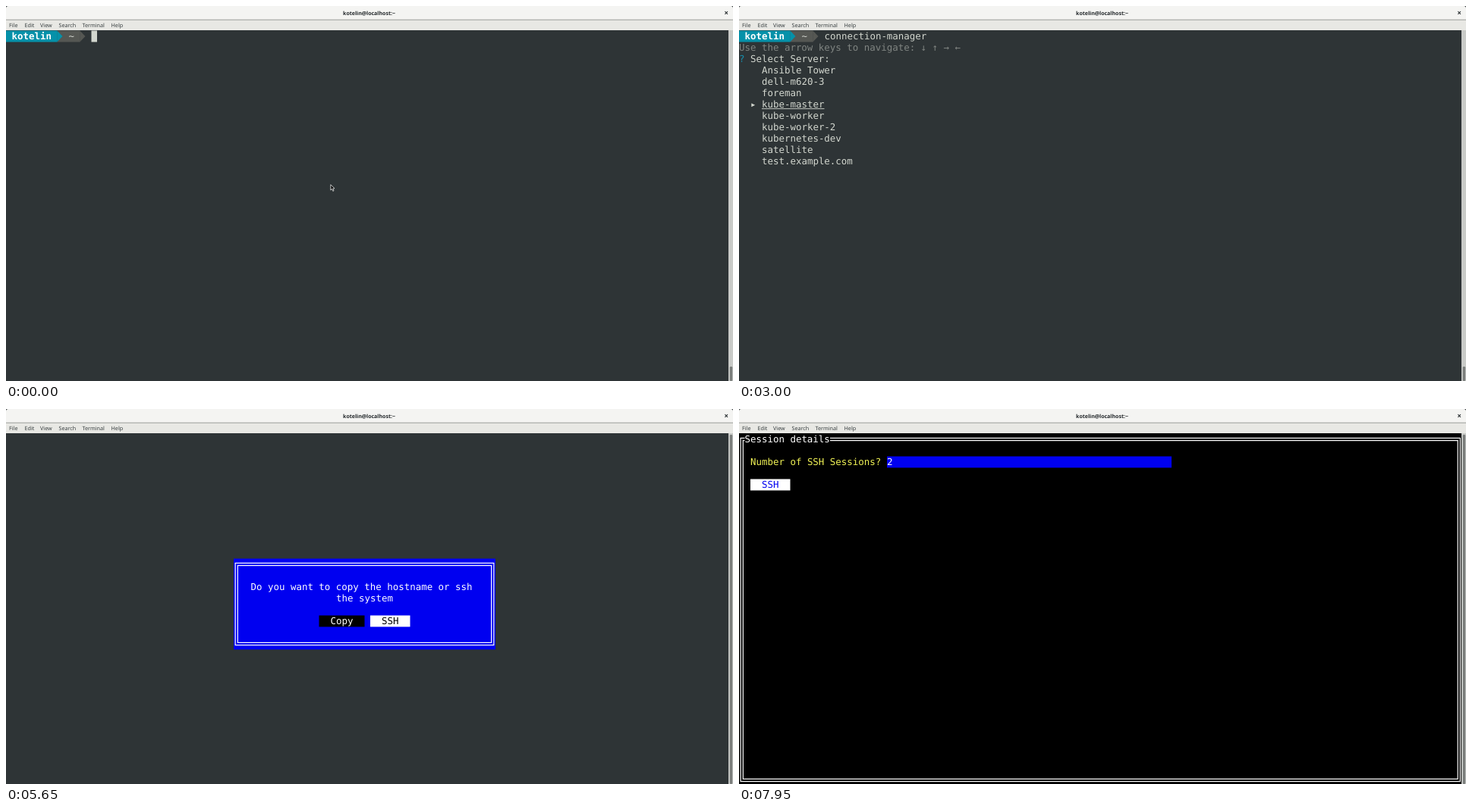
An HTML page for the animation above (8 s loop, 958 px wide and 495 px high).

```html
<!DOCTYPE html>
<html lang="en">
<head>
<meta charset="utf-8">
<title>Connection manager</title>
<style>
html, body { margin: 0; width: 100%; height: 100%; overflow: hidden; background: #2e3436; }
svg { display: block; width: 958px; height: 495px; }
text { white-space: pre; text-rendering: geometricPrecision; }
.mono { font: 12.457px "DejaVu Sans Mono", monospace; }
.ui { font: 7.2px "Noto Sans", "Open Sans", sans-serif; fill: #3a4042; }
.title { font-weight: 600; font-size: 7px; fill: #22272a; text-anchor: middle; }
</style>
</head>
<body>
<svg id="stage" viewBox="0 0 958 495" xmlns="http://www.w3.org/2000/svg">
  <rect width="958" height="32" fill="#2e3436"/>
  <path d="M0 18V3Q0 0 3 0H955Q958 0 958 3V18Z" fill="#f4f4f2"/>
  <rect y="17.5" width="958" height="1" fill="#c3c4c0"/>
  <rect y="18.5" width="958" height="13.5" fill="#e8e8e4"/>
  <text class="ui title" x="478.5" y="11.8">kotelin@localhost:~</text>
  <path d="M947.4 7.2l3.6 3.6m0-3.6l-3.6 3.6" stroke="#2e3436" stroke-width="1.1"/>
  <g id="menu" class="ui"></g>
  <g id="screen" class="mono"></g>
  <rect x="952" y="32" width="6" height="463" fill="#c9cbc8"/>
  <rect id="thumb" x="953.8" width="3.4" rx="1.2" fill="#7b7e7c"/>
</svg>
<script>
const LOOP = 8000, CW = 7.5, CH = 15, TOP = 32.5;
const FG = '#d3d7cf', BG = '#2e3436', BLUE = '#0000f0', TEAL = '#0591a9', GREY = '#555753';
const USER = 'kotelin', COMMAND = 'connection-manager';
const SERVERS = ['Ansible Tower', 'dell-m620-3', 'foreman', 'kube-master', 'kube-worker',
  'kube-worker-2', 'kubernetes-dev', 'satellite', 'test.example.com'];

// Steps are [start time, value] pairs; the last one reached applies.
const TYPED = [[0, 0], [550, 1], [850, 2], [1150, 3], [1300, 4], [1500, 19]];
const PICKED = [[1950, 0], [2450, 1], [3000, 3], [3050, 4], [3100, 6], [3150, 7], [3200, 8],
  [3600, 7], [3750, 6], [3900, 5], [4100, 4], [4200, 3], [4350, 2]];
const SESSIONS = [[6100, '1'], [7200, ''], [7550, '2']];

const $ = id => document.getElementById(id);
const at = (steps, t) => steps.reduce((v, [start, value]) => t >= start ? value : v, steps[0][1]);
const between = (t, a, b) => t >= a && t < b;

const rect = (x, y, w, h, fill) => `<rect x="${x}" y="${y}" width="${w}" height="${h}" fill="${fill}"/>`;
const cells = (col, row, w, h, fill) => rect(col * CW, TOP + row * CH, w * CW, h * CH, fill);
const text = (col, row, s, fill = FG, extra = '') =>
  `<text x="${col * CW}" y="${44.2 + row * CH}" fill="${fill}" ${extra}>${s}</text>`;
const cursor = (col, row) => cells(col, row, 1, 1, FG);
const button = (col, row, label, bg, fg) =>
  cells(col, row, label.length + 4, 1, bg) + text(col + 2, row, label, fg);

function doubleFrame(col, row, w, h) {
  const x = (col + .5) * CW, y = TOP + (row + .5) * CH;
  const outline = d => `<rect x="${x - d}" y="${y - d}" width="${(w - 1) * CW + 2 * d}"
    height="${(h - 1) * CH + 2 * d}" fill="none" stroke="#fff" stroke-width="1.2"/>`;
  return outline(1.6) + outline(-1.6);
}

function prompt() {
  const arrow = (col, fill) => {
    const x = col * CW;
    return `<path d="M${x - .2} ${TOP}L${x + 7} ${TOP + 7.5}L${x - .2} ${TOP + CH}Z" fill="${fill}"/>`;
  };
  return cells(9, 0, 4, 1, GREY) + cells(0, 0, 9, 1, TEAL) + arrow(9, TEAL) + arrow(13, GREY) +
    text(1, 0, USER, '#fff', 'font-weight="bold"') + text(11, 0, '~');
}

function pointer(t) {
  if (t >= 600) return '';
  const [x, y] = t < 50 ? [427.8, 235.8] : [425, 232];
  return `<path transform="translate(${x} ${y})" d="M0 0V7.2L1.8 5.7L3 8.6L4.2 8L3 5.2L5.2 5Z"
    fill="#111" stroke="#fff" stroke-width=".7"/>`;
}

function shell(t) {
  const n = at(TYPED, t);
  const shown = between(t, 250, 550) ? '' : cursor(15 + n, 0);
  return prompt() + text(15, 0, COMMAND.slice(0, n)) + shown + pointer(t);
}

function picker(t) {
  const picked = at(PICKED, t);
  const rows = SERVERS.map((name, i) => {
    const row = 3 + i, line = text(4, row, name);
    if (i !== picked) return line;
    return text(2, row, '▸') + line + rect(4 * CW, 45.2 + row * CH, name.length * CW, .9, FG);
  });
  return prompt() + text(15, 0, COMMAND) +
    text(0, 1, 'Use the arrow keys to navigate: ↓ ↑ → ←', '#808582') +
    text(0, 2, '?', '#168fae') + text(2, 2, 'Select Server:') + rows.join('');
}

function dialog(t) {
  const copy = t < 5650, on = ['#fff', '#000'], off = ['#000', '#fff'];
  return cells(40, 11, 46, 8, BLUE) + doubleFrame(40, 11, 46, 8) +
    text(43, 13, 'Do you want to copy the hostname or ssh', '#fff') +
    text(58, 14, 'the system', '#fff') +
    button(55, 16, 'Copy', ...(copy ? on : off)) +
    button(64, 16, 'SSH', ...(copy ? off : on));
}

function form(t) {
  const value = at(SESSIONS, t), done = t >= 7950;
  const hidden = done || between(t, 6650, 7150);
  return rect(0, 32, 952, 463, '#000') + doubleFrame(0, 0, 127, 31) +
    cells(1, 0, 15, 1, '#000') + text(1, 0, 'Session details', '#fff') +
    text(2, 2, 'Number of SSH Sessions?', '#f0f255') +
    cells(26, 2, 50, 1, BLUE) + text(26, 2, value, '#fff') +
    (hidden ? '' : cursor(26 + value.length, 2)) +
    button(2, 4, 'SSH', ...(done ? ['#fff', BLUE] : [BLUE, '#fff']));
}

const SCENES = [[0, shell], [1950, picker], [4850, dialog], [6100, form]];
let last = '';

function draw(t) {
  const markup = rect(0, 32, 952, 463, BG) + at(SCENES, t)(t);
  if (markup === last) return;
  last = markup;
  $('screen').innerHTML = markup;
  const y = t < 4850 ? 476 : 34;
  $('thumb').setAttribute('y', y);
  $('thumb').setAttribute('height', 495 - y);
}

$('menu').innerHTML = [[4, 'File'], [24.5, 'Edit'], [45, 'View'], [69.5, 'Search'],
  [100.5, 'Terminal'], [138.5, 'Help']]
  .map(([x, label]) => `<text x="${x}" y="28">${label}</text>`).join('');

const start = performance.now();
function tick() {
  draw((performance.now() - start) % LOOP);
  requestAnimationFrame(tick);
}
tick();
</script>
</body>
</html>
```
